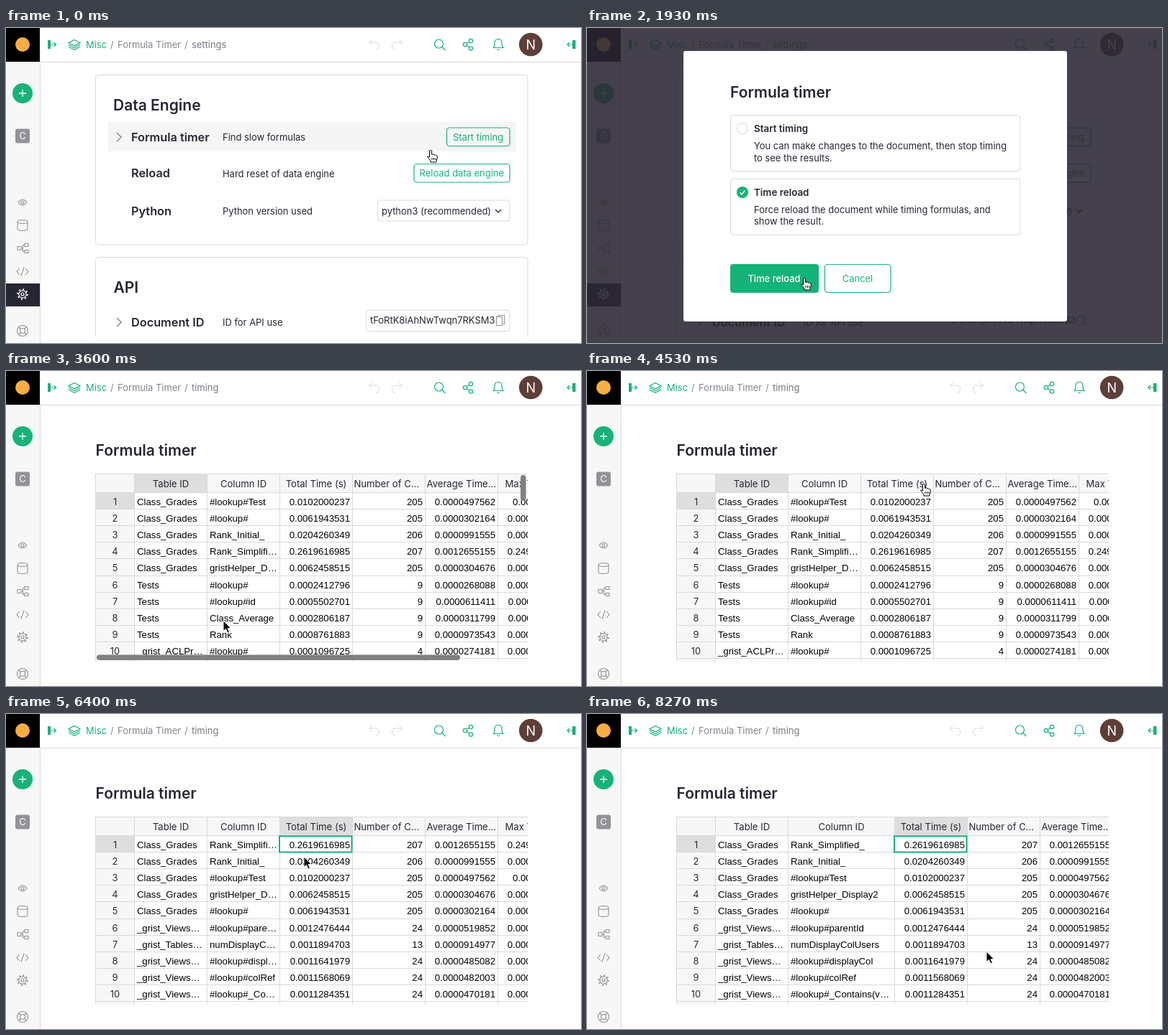
Animation of 799 by 439 pixels, one loop 8.48 s. Source, as an HTML page:

```html
<!DOCTYPE html>
<html lang="en">
<head>
<meta charset="utf-8">
<title>Formula timer</title>
<style>
html, body { margin: 0; width: 100%; height: 100%; overflow: hidden; background: #fff; }
#stage { position: relative; width: 799px; height: 439px; overflow: hidden; background: #fff; }
#stage > svg { position: absolute; left: 0; top: 0; }
svg { font: 12.95px Inter, "DejaVu Sans", sans-serif; fill: #262633; }
.h { font-size: 21px; font-weight: 600; }
.b { font-size: 16.3px; font-weight: 600; }
.o { font-size: 13.4px; font-weight: 600; }
.g { fill: #16b378; }
.mid { text-anchor: middle; }
.end { text-anchor: end; }
.off { fill: #d9d9d9; }
.line { fill: none; stroke: #d9d9d9; }
.green { fill: none; stroke: #16b378; stroke-width: 1.2; }
.icon { fill: none; stroke: #929299; stroke-width: 1.1; }
#grid { position: absolute; left: 124px; top: 143px; width: 601px; height: 262px; overflow: hidden; }
.col { position: absolute; top: 0; height: 270px; box-sizing: border-box; border-right: 1px solid #d9d9d9; }
.col div { box-sizing: border-box; height: 23.2px; line-height: 25px; padding: 0 3px; overflow: hidden;
  white-space: nowrap; text-overflow: ellipsis; border-bottom: 1px solid #d9d9d9;
  font-family: "Liberation Sans", Arial, sans-serif; font-size: 13.2px; color: #000; }
.col .head { height: 26.6px; text-align: center; padding: 0 1.5px; background: #f7f7f7;
  border-top: 1px solid #d9d9d9; font: 13.1px/27px Inter, sans-serif; color: #262633; }
.col.nums { border-left: 1px solid #d9d9d9; }
.col.nums div { background: #f7f7f7; text-align: center; font-family: Inter, sans-serif; font-size: 12.8px; color: #262633; }
.col.right div:not(.head) { text-align: right; }
.col .head.sel, .col.nums div.sel { background: #dedede; }
.col.picked div:not(.head) { background: #dcf2e9; }
</style>
</head>
<body>
<div id="stage">
  <svg id="base" width="799" height="439"></svg>
  <div id="grid"></div>
  <svg id="top" width="799" height="439"></svg>
</div>
<script>
const LOOP = 8480;
const $ = id => document.getElementById(id);
const show = (id, on) => { $(id).style.display = on ? '' : 'none'; };

// y is the vertical middle of the line
const text = (x, y, s, cls = '') => `<text x="${x}" y="${y + 4.6}" class="${cls}">${s}</text>`;
const big = (x, y, s, cls) => `<text x="${x}" y="${y}" class="${cls}">${s}</text>`;
const box = (x, y, w, h, cls = 'line', r = 4) =>
  `<rect x="${x}" y="${y}" width="${w}" height="${h}" rx="${r}" class="${cls}"/>`;
const fill = (x, y, w, h, color, r = 0) =>
  `<rect x="${x}" y="${y}" width="${w}" height="${h}" rx="${r}" fill="${color}"/>`;
const path = (d, cls = 'icon', extra = '') => `<path d="${d}" class="${cls}" ${extra}/>`;
const group = (id, body) => `<g id="${id}">${body}</g>`;
const ring = (x, y, r, cls = 'icon') => `<circle cx="${x}" cy="${y}" r="${r}" class="${cls}"/>`;
const chevron = y => path(`M154 ${y - 6}l6 6-6 6`, 'icon', 'style="stroke-width:1.7"');

const gear = color => `<g fill="none" stroke="${color}">
  <circle cx="23" cy="371" r="5.2" stroke-width="1.2"/><circle cx="23" cy="371" r="2" stroke-width="1.2"/>
  <circle cx="23" cy="371" r="6.8" stroke-width="2" stroke-dasharray="2 3.34"/></g>`;

const frameParts =
  fill(0, 47, 47, 392, '#f7f7f7') + path('M47.5 47V439M48 47.5H799', 'line') +
  fill(0, 0, 47, 47, '#000') + '<circle cx="23" cy="23" r="10" fill="#f9ae41"/>' +
  fill(58, 17, 4, 12, '#16b378') + path('M62 23H69.5M66.5 20l3 3-3 3', 'green') +
  fill(787, 17, 4.5, 12, '#16b378') + path('M787 23H780M783 20l-3 3 3 3', 'green') +
  path('M677 27.5H691Q689 26 689 22V20.5Q689 15.5 684 15.5T679 20.5V22Q679 26 677 27.5M682 29.5Q684 32 686 29.5', 'green') +
  '<circle cx="729.2" cy="23" r="16.3" fill="#5d3f37"/>' +
  '<text x="729.2" y="29.5" class="mid" style="font-size:18px;fill:#fff">N</text>';

const toolParts =
  path('M95 16.5l8 4.2-8 4.2-8-4.2zM87 23.3l8 4.2 8-4.2M87 26l8 4.2 8-4.2', 'green') +
  text(111, 23, 'Misc', 'g') +
  '<g style="fill:#85858d">' + text(145, 23, '/') + text(155, 23, 'Formula Timer') + text(248, 23, '/') + '</g>' +
  '<text id="crumb" x="258" y="27.6" style="fill:#77777f"></text>' +
  path('M505 20H514Q518.5 20 518.5 25T514 30.5M509 15.5L504.5 20 509 24.5', 'line') +
  path('M550 20H541Q536.5 20 536.5 25T541 30.5M546 15.5L550.5 20 546 24.5', 'line') +
  ring(601.5, 22, 6, 'green') + path('M606 26.5l4.5 4.5', 'green') +
  ring(638, 23, 2.7, 'green') + ring(646, 18, 2.7, 'green') + ring(646, 28.5, 2.7, 'green') +
  path('M640.5 21.6l3.2-2M640.5 24.5l3.2 2.2', 'green') +
  '<circle cx="23" cy="91" r="14" class="g"/>' + path('M18 91H28M23 86V96', '', 'stroke="#fff" stroke-width="1.3"') +
  fill(13, 140.5, 20, 20, '#929299', 3) + '<text x="23" y="155.3" class="mid" style="fill:#fff">C</text>' +
  path('M17 243Q23 235 29 243Q23 251 17 243Z') + ring(23, 243, 2) +
  path('M16 270Q16 267.5 23 267.5T30 270V280Q30 282.5 23 282.5T16 280ZM16 270Q16 272.5 23 272.5T30 270') +
  path('M16 304.5h5v5h-5zM26 300.5h5v4h-5zM26 309.5h5v4h-5zM21 307h2.5M26 302.5h-2.5V311.5h2.5') +
  path('M19 335l-4 4.5 4 4.5M27 335l4 4.5-4 4.5M25 333.5l-4 12') +
  ring(23, 422, 7.5) + ring(23, 422, 3.5) +
  path('M17.7 416.7l2.8 2.8M28.3 416.7l-2.8 2.8M17.7 427.3l2.8-2.8M28.3 427.3l-2.8-2.8');

const settingsParts =
  fill(0, 356, 47, 32, '#262633') + gear('#fff') +
  '<clipPath id="fold"><path d="M48 48H799V430H48Z"/></clipPath><g clip-path="url(#fold)">' +
  box(124.5, 65.5, 600.5, 236.5) + box(124.5, 319.5, 600.5, 200) +
  big(149, 114.5, 'Data Engine', 'h') + fill(142, 131, 567, 41, '#f5f5f5') + chevron(152) +
  big(174, 157.5, 'Formula timer', 'b') + text(301, 152.5, 'Find slow formulas') +
  box(612.5, 139, 87.5, 25.5, 'green') + text(656, 152, 'Start timing', 'g mid') +
  big(174, 208, 'Reload', 'b') + text(301, 203, 'Hard reset of data engine') +
  box(567, 189.5, 133, 25.5, 'green') + text(633.3, 202.5, 'Reload data engine', 'g mid') +
  big(174, 260.5, 'Python', 'b') + text(301, 255, 'Python version used') +
  box(516.5, 240, 183.5, 29) + text(522, 255, 'python3 (recommended)') +
  path('M680 253l4 4 4-4', '', 'fill="none" stroke="#262633" stroke-width="1.4"') +
  big(149.5, 369, 'API', 'h') + chevron(410) +
  big(174, 415.5, 'Document ID', 'b') + text(301, 410, 'ID for API use') +
  box(500.5, 393, 199.5, 29.5) + text(506, 407.5, 'tFoRtK8iAhNwTwqn7RKSM3') +
  path('M684.5 402.5V400.5H692.5V412.5H690.5M681.5 402.5h8v12h-8z') + '</g>';

$('base').innerHTML = group('frame', frameParts) + group('tools', toolParts) +
  group('settings', settingsParts) +
  group('timing', gear('#929299') + big(124.5, 118, 'Formula timer', 'h'));

const option = (y, title, a, b) => box(199.5, y, 402.5, 78) + text(232, y + 19, title, 'o') +
  text(232, y + 43, a) + text(232, y + 59.5, b);

const modalParts =
  '<rect width="799" height="439" fill="rgb(43,39,52)" fill-opacity=".88"/>' +
  fill(134, 32, 533, 377, '#fff', 3) + big(199, 97, 'Formula timer', 'h') +
  option(121.5, 'Start timing', 'You can make changes to the document, then stop timing', 'to see the results.') +
  option(210, 'Time reload', 'Force reload the document while timing formulas, and', 'show the result.') +
  ring(216, 140, 7.5, 'line') + ring(216, 229, 7.5, 'line') +
  group('check', '<circle r="8" class="g"/>' + path('M-3.5 .3l2.5 2.5 4.5-5.3', '', 'fill="none" stroke="#fff" stroke-width="1.5"')) +
  fill(199, 329, 123, 40, '#16b378', 4) +
  '<text id="go" x="260" y="354" class="mid" style="font-weight:500;fill:#fff"></text>' +
  box(330.5, 329.5, 91.5, 39, 'green') + text(376, 349, 'Cancel', 'g mid');

// Items with a key, even an empty one, are disabled
const menuItem = (y, label, key) => text(486, y, label, key === undefined ? '' : 'off') +
  (key ? text(682, y, key, 'off end') : '');
const sortIcon = (x, d) => path(`M${x} 98.5V110M${x - 3} ${d > 0 ? 107 : 101.5}l3 ${3 * d} 3 ${-3 * d}` +
  `M${x + 5} ${d > 0 ? 100 : 109}h7M${x + 5} 104.5h5M${x + 5} ${d > 0 ? 109 : 100}h3`,
  '', 'fill="none" stroke="#262633" stroke-width="1.2"');

const menuParts =
  fill(543, 405, 175, 19, '#ececec', 2) + text(551, 414, 'SUM 0.3266041205') + text(716, 414, '91×1', 'end') +
  '<rect x="462" y="6" width="232" height="411" rx="4" fill="#fff" style="filter:drop-shadow(0 2px 9px rgba(38,38,51,.55))"/>' +
  '<clipPath id="sheet"><rect x="462" y="6" width="232" height="411" rx="4"/></clipPath><g clip-path="url(#sheet)">' +
  path('M462 87.5H694M462 120.5H694M462 154.5H694M462 236.5H694M462 382.5H694', 'line', 'opacity=".8"') +
  menuItem(31, 'Column Options') + menuItem(63, 'Filter Data') + menuItem(104, 'Sort') +
  sortIcon(580, -1) + text(593, 104, 'A-Z') + sortIcon(636, 1) + text(648, 104, 'Z-A') +
  menuItem(138, 'More sort options...') + menuItem(179.5, 'Rename column', '^M') +
  menuItem(211.5, 'Freeze 3 columns') + menuItem(261, 'Clear values', 'Backspace') +
  menuItem(293.5, 'Hide column', '⌥⇧-') + menuItem(325.5, 'Reset column', '') +
  menuItem(358, 'Delete column', '⌥-') + menuItem(407, 'Insert column to the left', '⌥⇧=') +
  fill(685.5, 8, 7, 354, '#808080', 3.5) + '</g>';

const pointerParts =
  group('arrow', path('M0 0V14.5L3.4 11.4 5.9 17 8.4 15.9 6 10.5H10.5Z', '', 'fill="#000" stroke="#fff"')) +
  group('hand', path('M-1.5 1.2Q0-.8 1.6 1.2V6.2L3.2 6Q4.6 5.8 5 7Q6.8 6.3 7.5 7.8Q9.3 7.2 9.4 9.5Q9.6 12.5 8 15V17H0V15Q-2 12.5-4.6 9.5Q-3.8 7.8-1.5 10Z' +
    'M2 11v3M4.5 11v3M7 11v3', '', 'fill="#fff" stroke="#000"')) +
  group('resize', path('M-1.5-7V7M1.5-7V7M-2-.7V.7H-5V3L-9 0-5-3V-.7ZM2-.7V.7H5V3L9 0 5-3V-.7Z', '', 'fill="#000" stroke="#000" stroke-width=".9"'));

$('top').innerHTML =
  group('bars', fill(715, 145, 7.5, 36, '#808080', 3.7) + fill(126, 395.5, 505, 7.5, '#808080', 3.7)) +
  '<rect id="cell" y="170.3" width="100.5" height="22.2" fill="none" stroke="#16b378" stroke-width="2"/>' +
  group('menu', menuParts) + group('modal', modalParts) + group('pointer', pointerParts);

// Rows: table, column, total, calls, average, longest
const rows = s => s.trim().split('\n').map(r => r.trim().split(' '));
const unsorted = rows(`
  Class_Grades #lookup#Test 0.0102000237 205 0.0000497562 0.004100084
  Class_Grades #lookup# 0.0061943531 205 0.0000302164 0.0000979900
  Class_Grades Rank_Initial_ 0.0204260349 206 0.0000991555 0.0005030632
  Class_Grades Rank_Simplified_ 0.2619616985 207 0.0012655155 0.2490029335
  Class_Grades gristHelper_Display2 0.0062458515 205 0.0000304676 0.0000889301
  Tests #lookup# 0.0002412796 9 0.0000268088 0.0000529289
  Tests #lookup#id 0.0005502701 9 0.0000611411 0.0001151562
  Tests Class_Average 0.0002806187 9 0.0000311799 0.0000450611
  Tests Rank 0.0008761883 9 0.0000973543 0.0002138615
  _grist_ACLPrincipals #lookup# 0.0001096725 4 0.0000274181 0.0000369549`);
const sorted = [3, 2, 0, 4, 1].map(i => unsorted[i]).concat(rows(`
  _grist_Views_section_field #lookup#parentId 0.0012476444 24 0.0000519852 0.0000870228
  _grist_Tables_column numDisplayColUsers 0.0011894703 13 0.0000914977 0.0002028942
  _grist_Views_section_field #lookup#displayCol 0.0011641979 24 0.0000485082 0.0000698566
  _grist_Views_section_field #lookup#colRef 0.0011568069 24 0.0000482003 0.0000660419
  _grist_Views_section_field #lookup#_Contains(value 0.0011284351 24 0.0000470181 0.0000638962`));
const heads = ['', 'Table ID', 'Column ID', 'Total Time (s)', 'Number of Calls', 'Average Time (s)', 'Max Time (s)'];

const cols = heads.map((name, c) => {
  const el = document.createElement('div');
  el.className = 'col' + (c === 0 ? ' nums' : c > 2 ? ' right' : '');
  el.innerHTML = `<div class="head">${name}</div>` +
    Array.from({ length: 11 }, (_, r) => `<div>${c || r > 9 ? '' : r + 1}</div>`).join('');
  $('grid').append(el);
  return el;
});

let shown = null;
function setRows(data) {
  if (shown === data) return;
  shown = data;
  data.forEach((row, r) => row.forEach((v, c) => { cols[c + 1].children[r + 1].textContent = v; }));
}

const clamp = v => Math.max(0, Math.min(1, v));
const ramp = (t, a, b) => clamp((t - a) / (b - a));
const ease = p => p * p * (3 - 2 * p);

// time, x, y of the pointer tip
const track = [
  [70, 590, 170], [270, 645, 158], [700, 645, 158], [1130, 330, 240], [1450, 330, 240],
  [1930, 302, 348], [3730, 302, 348], [4500, 468, 157], [4720, 468, 157], [5200, 597, 118],
  [5420, 652, 103], [5700, 652, 103], [6270, 500, 235], [6400, 414, 199], [6600, 380, 157],
  [6800, 380, 157], [7230, 427, 157], [7280, 427, 157], [7600, 516, 300], [7800, 555, 331]
];
function pointerAt(t) {
  const i = track.findIndex(k => k[0] > t);
  if (i === 0) return track[0].slice(1);
  if (i < 0) return track[track.length - 1].slice(1);
  const [a, b] = [track[i - 1], track[i]], p = ease(ramp(t, a[0], b[0]));
  return [a[1] + (b[1] - a[1]) * p, a[2] + (b[2] - a[2]) * p];
}
function pointerKind(t) {
  if (t < 460 || t >= 1800 && t < 2140 || t >= 4500 && t < 5740) return 'hand';
  return t >= 6560 && t < 7290 ? 'resize' : 'arrow';
}

function draw(t) {
  const settings = t < 2200, loaded = t >= 2930, table = t >= 3070;
  const menu = t >= 4600 && t < 5600, isSorted = t >= 5740, picked = t >= 4600 && !isSorted;
  show('settings', settings);
  show('tools', settings || loaded);
  show('timing', loaded);
  show('grid', table);
  $('crumb').textContent = settings ? 'settings' : 'timing';

  show('modal', t >= 400 && t < 2100);
  $('modal').setAttribute('opacity', ease(ramp(t, 380, 590)));
  const reload = t >= 1400;
  $('check').setAttribute('transform', `translate(216 ${reload ? 229 : 140})`);
  $('go').textContent = reload ? 'Time reload' : 'Start timing';

  setRows(isSorted ? sorted : unsorted);
  const wide = 101 + 47 * ease(ramp(t, 6800, 7230));
  let x = 0;
  cols.forEach((el, c) => {
    const w = c === 0 ? 55 : c === 2 ? wide : 101;
    el.style.left = x + 'px';
    el.style.width = w + 'px';
    x += w;
    el.firstChild.classList.toggle('sel', c === (t < 4600 ? 1 : 3));
  });
  cols[3].classList.toggle('picked', picked);
  [...cols[0].children].forEach((el, r) => el.classList.toggle('sel', r === 1 || r > 1 && picked));
  show('cell', t >= 4600);
  $('cell').setAttribute('x', 279 + wide);
  show('bars', table && t < 4400);
  $('bars').setAttribute('opacity', 1 - ramp(t, 4100, 4400));
  show('menu', menu);

  const [px, py] = pointerAt(t), kind = pointerKind(t);
  $('pointer').setAttribute('transform', `translate(${px} ${py})`);
  ['arrow', 'hand', 'resize'].forEach(k => show(k, k === kind));
}

const start = performance.now();
function tick() {
  draw((performance.now() - start) % LOOP);
  requestAnimationFrame(tick);
}
tick();
</script>
</body>
</html>
```
